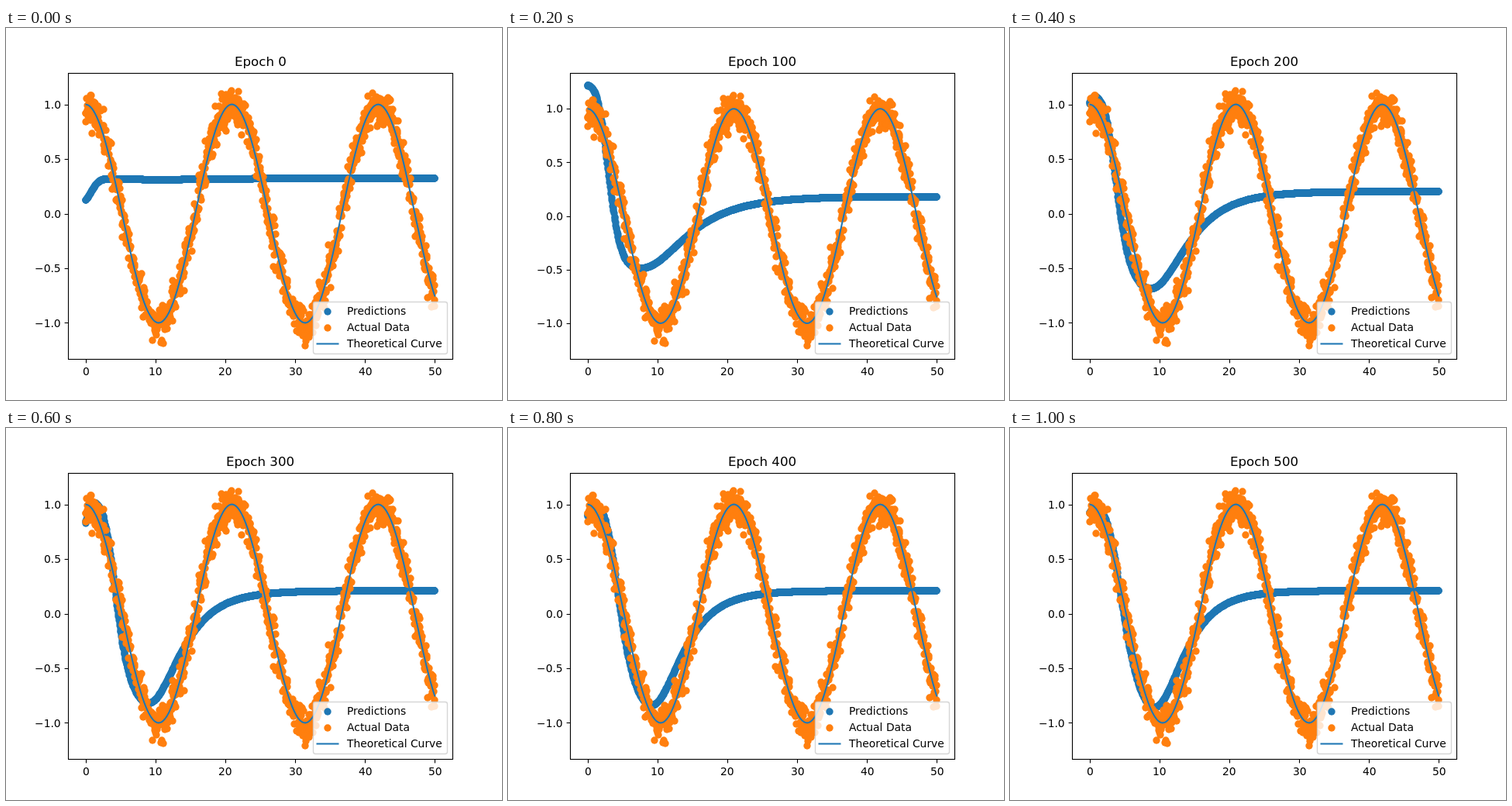
An HTML page with a canvas for the animation above (1.1 s loop, 640x480 px).

```html
<!DOCTYPE html>
<html lang="en">
<head>
<meta charset="utf-8">
<title>Curve fit by epoch</title>
<style>
html, body { margin: 0; width: 100%; height: 100%; overflow: hidden; background: #fff; }
canvas { display: block; }
</style>
</head>
<body>
<canvas id="stage" width="640" height="480"></canvas>
<script>
const ctx = document.getElementById('stage').getContext('2d');
const BLUE = '#1f77b4', ORANGE = '#ff7f0e';
const BOX = { left: 80, right: 576, top: 57.6, bottom: 427.2 };
const STEP = 100, STEPS = 11, LOW = -1.213, HIGH = 1.172, DOT = 4.7, COUNT = 1000;

// The model output levels off at `rest`, with a dip and an early hump
const poses = [
  { step: 0, rest: .321, dip: .01, dipX: 11, dipRate: .2, hump: -.22, humpX: -.8, humpW: 2 },
  { step: 1, rest: .09, dip: .165, dipX: 9, dipRate: .137, hump: .79, humpX: .2, humpW: 3.1 },
  { step: 2, rest: .18, dip: .67, dipX: 7.6, dipRate: .18, hump: 1.37, humpX: .5, humpW: 3 },
  { step: 3, rest: .198, dip: .82, dipX: 8.6, dipRate: .212, hump: 1.2, humpX: 1, humpW: 3.1 },
  { step: 6, rest: .208, dip: 1.03, dipX: 9, dipRate: .256, hump: 1.1, humpX: 1.8, humpW: 2.9 },
  { step: 10, rest: .209, dip: 1.07, dipX: 9.3, dipRate: .279, hump: .98, humpX: 1.5, humpW: 3.45 }
];

const px = x => 102.545 + x * 9.0182;
const wave = x => Math.cos(.3 * x);
const snap = v => Math.floor(v + .5) + .5;

function scaleY(high) {
  const unit = 336 / (high - LOW);
  return v => 74.4 + (high - v) * unit;
}

function makeRandom(seed) {
  return () => {
    seed = (seed + 0x6D2B79F5) | 0;
    let t = Math.imul(seed ^ (seed >>> 15), 1 | seed);
    t = (t + Math.imul(t ^ (t >>> 7), 61 | t)) ^ t;
    return ((t ^ (t >>> 14)) >>> 0) / 4294967296;
  };
}

// Evenly spread samples of the wave with normal noise
function makeData() {
  const rnd = makeRandom(11);
  const normal = () => Math.sqrt(-2 * Math.log(1 - rnd())) * Math.cos(2 * Math.PI * rnd());
  const list = [];
  while (list.length < COUNT) {
    const x = (list.length + rnd()) * 50 / COUNT;
    const y = wave(x) + .085 * normal();
    if (y > LOW && y < HIGH) list.push({ x, y });
  }
  return list;
}
const data = makeData();

function poseAt(step) {
  const next = poses.findIndex(p => p.step >= step);
  const b = poses[next], a = poses[Math.max(0, next - 1)];
  const u = a === b ? 0 : (step - a.step) / (b.step - a.step);
  const pose = {};
  for (const key in a) pose[key] = a[key] + (b[key] - a[key]) * u;
  return pose;
}

function predict(p, x) {
  const dip = p.dip / Math.cosh(p.dipRate * (x - p.dipX));
  const hump = p.hump * Math.exp(-Math.pow(Math.abs(x - p.humpX) / p.humpW, 2.5));
  return p.rest - dip + hump;
}

function dot(x, y, color) {
  ctx.fillStyle = color;
  ctx.beginPath();
  ctx.arc(Math.round(x), Math.round(y), DOT, 0, Math.PI * 2);
  ctx.fill();
}

function stroke(points, color, width) {
  ctx.strokeStyle = color;
  ctx.lineWidth = width;
  ctx.beginPath();
  points.forEach(([x, y]) => ctx.lineTo(x, y));
  ctx.stroke();
}

// `shift` is the part of the ink width left of x: 0 left, .5 centre, 1 right
function text(str, x, y, shift = 0, size = 13.89) {
  ctx.font = size + 'px "DejaVu Sans", sans-serif';
  ctx.fillStyle = '#000';
  const width = ctx.measureText(str).actualBoundingBoxRight;
  ctx.fillText(str, Math.round(x - width * shift), y);
}

function drawAxes(py) {
  for (let v = 0; v <= 50; v += 10) {
    const x = snap(px(v));
    stroke([[x, 427.5], [x, 432.4]], '#000', 1.11);
    text(String(v), px(v), 448, .5);
  }
  for (let v = -1; v <= 1; v += .5) {
    const y = snap(py(v));
    stroke([[75.6, y], [80.5, y]], '#000', 1.11);
    text(v.toFixed(1).replace('-', '\u2212'), 70.3, Math.round(py(v) + 5.2), 1);
  }
  ctx.strokeStyle = '#000';
  ctx.lineWidth = 1.11;
  ctx.strokeRect(80.5, 58.5, 496, 369);
}

function drawLegend() {
  ctx.beginPath();
  ctx.roundRect(396.5, 353.5, 173, 67, 2.8);
  ctx.fillStyle = 'rgba(255,255,255,.8)';
  ctx.fill();
  ctx.strokeStyle = 'rgba(204,204,204,.8)';
  ctx.lineWidth = 1.39;
  ctx.stroke();
  dot(415, 366, BLUE);
  dot(415, 387, ORANGE);
  stroke([[400.5, 407.5], [429.5, 407.5]], BLUE, 2.08);
  text('Predictions', 440, 370);
  text('Actual Data', 440, 391);
  text('Theoretical Curve', 440, 412);
}

function draw(step) {
  const pose = poseAt(step);
  const guesses = data.map(p => predict(pose, p.x));
  const py = scaleY(Math.max(HIGH, ...guesses));
  ctx.fillStyle = '#fff';
  ctx.fillRect(0, 0, 640, 480);

  ctx.save();
  ctx.beginPath();
  ctx.rect(BOX.left, BOX.top, BOX.right - BOX.left, BOX.bottom - BOX.top);
  ctx.clip();
  data.forEach((p, i) => dot(px(p.x), py(guesses[i]), BLUE));
  data.forEach(p => dot(px(p.x), py(p.y), ORANGE));
  const curve = Array.from({ length: 501 }, (_, i) => [px(i / 10), py(wave(i / 10))]);
  stroke(curve, BLUE, 2.08);
  ctx.restore();

  drawAxes(py);
  text('Epoch ' + step * 50, 328, 49, .5, 16.67);
  drawLegend();
}

const start = performance.now();
let shown = -1;
function tick() {
  const step = Math.floor((performance.now() - start) / STEP) % STEPS;
  if (step !== shown) draw(shown = step);
  requestAnimationFrame(tick);
}
tick();
</script>
</body>
</html>
```
